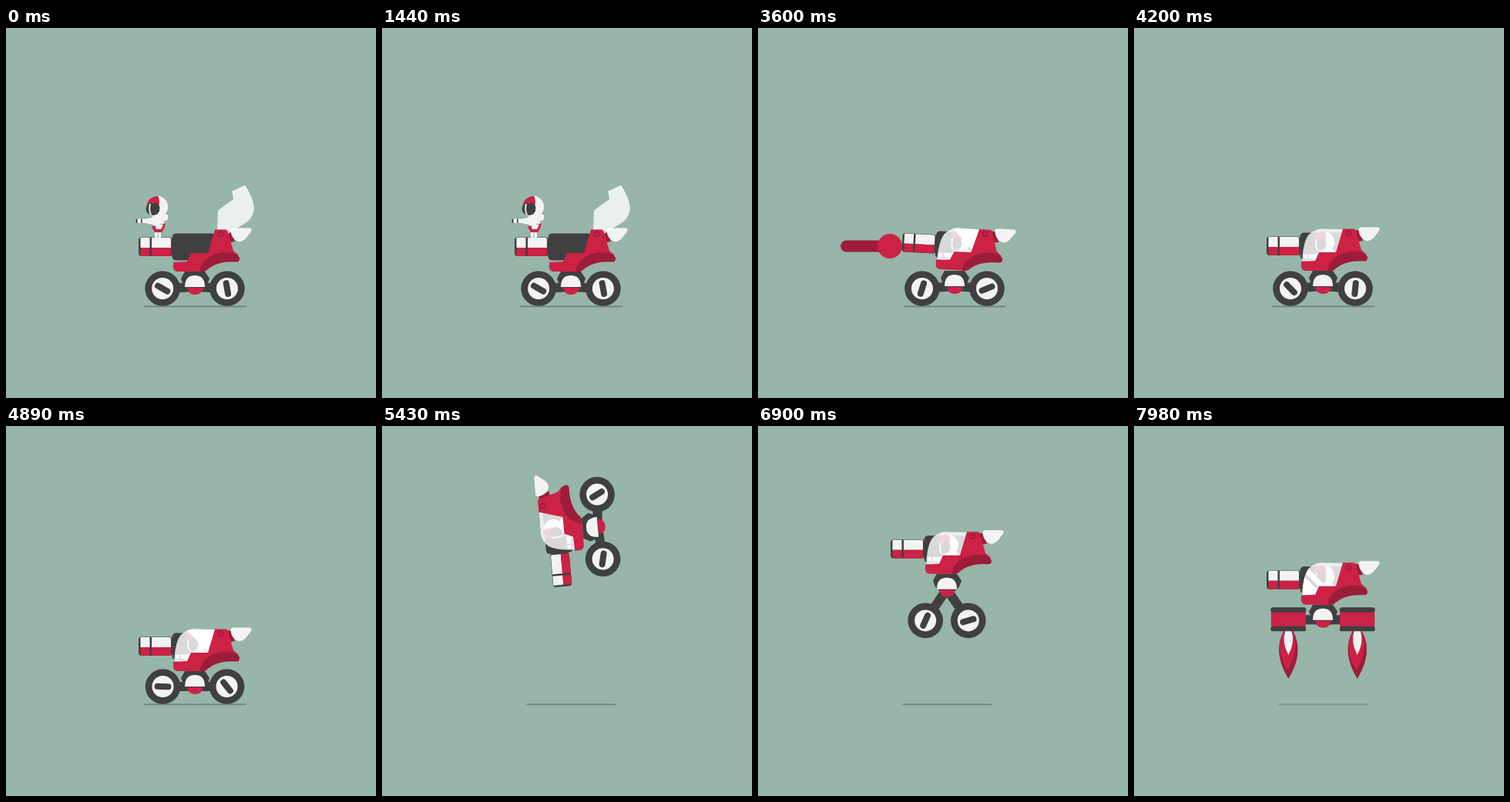
An HTML page that plays this animation: 480x480 px, repeating every 8 s.

```html
<!DOCTYPE html>
<html lang="en">
<head>
<meta charset="utf-8">
<title>Rover</title>
<style>
  html, body { margin: 0; width: 100%; height: 100%; overflow: hidden; background: #97b5a9; }
  svg { display: block; width: 100%; height: 100%; }
  .dark { fill: #404040; }
  .red { fill: #cb2246; }
  .deep { fill: #9c1d3a; }
  .white { fill: #f3f3f3; }
</style>
</head>
<body>
<svg viewBox="0 0 480 480">
  <defs>
    <path id="glass" d="M272 261 H262 L242 260.500 Q232 262 226 269 Q219 279 218.500 302 L237 304.500 L241 295 L266 293.500 L281 272 Z"/>
    <clipPath id="glassClip"><use href="#glass"/></clipPath>
    <g id="disc">
      <circle r="22.800" class="dark"/>
      <circle r="14" class="white"/>
    </g>
    <g id="jet">
      <rect x="-22.500" y="-11" width="45" height="22" rx="3" class="red"/>
      <rect x="-23" y="-15.500" width="46" height="6.500" rx="3.200" class="dark"/>
      <rect x="-23" y="9" width="46" height="6.500" rx="3.200" class="dark"/>
    </g>
    <g id="fire">
      <path d="M-6 0 Q-21 28 0 62 Q21 28 6 0 Z" class="deep"/>
      <path d="M-6 0 Q-18 26 -1 50 Q15 26 6 0 Z" class="red"/>
      <path d="M-4 0 Q-9 14 0 31 Q9 14 4 0 Z" class="white"/>
    </g>
  </defs>

  <rect width="480" height="480" fill="#97b5a9"/>
  <rect id="shadow" y="360.300" height="2" rx="1" fill="#6b8a7e"/>

  <g id="rover">
    <g id="base">
      <g id="legs" stroke="#404040" stroke-width="12" stroke-linecap="round"><line/><line/></g>
      <path d="M232 315 H258 L264 324 L261 332 L254 339 H237 L230 332 L227 324 Z" class="dark"/>
      <path d="M232 335 Q232 320 245 320 Q258 320 258 335 Z" class="white"/>
      <path d="M235 336 H256 Q254 345 245 345 Q237 345 235 336 Z" class="red"/>
      <g id="wheels"></g>
    </g>
    <g id="upper">
      <path d="M287 262 L293 263 L297 276 L291 277 Z" class="deep"/>
      <path d="M294 258.500 H316 Q320 259 318 263 L311 272 Q306 277 301 276 Q293 273 291.500 263 Q291 259 294 258.500 Z" class="white"/>
      <rect x="215.500" y="265.500" width="56" height="35" rx="5" class="dark"/>
      <rect x="172" y="270.500" width="44" height="24.500" rx="4" class="dark"/>
      <path d="M174.500 271 H186.500 V284 H174.500 Z M189 271 H212 Q214 271 214 273 V284 H189 Z" class="white"/>
      <path d="M174.500 284 H186.500 V295 H176 Q174.500 295 174.500 293 Z M189 284 H214 V293 Q214 295 212 295 H189 Z" class="red"/>
      <g id="pilot">
        <g id="pilotLegs" class="white">
          <rect x="193" y="261" width="3.500" height="11"/>
          <rect x="197.500" y="261" width="3.500" height="11"/>
        </g>
        <path d="M189 244 H204 L206 256 H191 Z" class="white"/>
        <path d="M189 257 L193 255 L207 252.500 L205 259 L202 264 H193 Z" class="red"/>
        <path d="M193 254 H204 L201 260 H195 Z" class="white"/>
        <circle cx="196.300" cy="230.800" r="13.800" class="white"/>
        <path d="M182.500 232 A13.800 13.800 0 0 1 197 217 Q200 222 198.500 229 L190 225 Z" class="red"/>
        <path d="M190 225.500 Q200 225.500 199.500 233.500 Q199 242 190 242 Q181 240.500 181.500 232.500 Q183 225.500 190 225.500 Z" class="dark"/>
        <path d="M187 227 Q185 235 188 241.500" fill="none" stroke="#f3f3f3" stroke-width="1.800"/>
        <path d="M183 246.500 L205 241 L207 248 L193 254 L183 253 Z" class="white"/>
        <circle cx="206" cy="244.500" r="4.500" class="white"/>
        <rect x="168.500" y="246.500" width="16" height="5.500" class="white"/>
        <path d="M168.500 246.500 h2 v5.500 h-2 Z M175 246.500 h1.500 v5.500 h-1.500 Z" class="dark"/>
      </g>
      <g id="canopy">
        <use href="#glass" fill="#fff" opacity=".8"/>
        <g clip-path="url(#glassClip)"><g id="glint" fill="#fff">
          <path d="M200 200 h34 l150 150 h-34 Z"/>
          <path d="M240 200 h10 l150 150 h-10 Z"/>
        </g></g>
      </g>
      <path d="M217 303 L235 302 L240 291 L262 291 L271 260.500 H285 Q287 260.500 288 264 L295 288 L302 294 L284 297 Q266 302 255 315 H224 Q217 315 217 309 Z" class="red"/>
      <path d="M251 316 Q252 303 265 295 Q278 288.500 294 290.500 Q302 293 303 298 Q303 303 298 302.500 Q273 301 259 314.500 Z" class="deep"/>
      <circle cx="278.500" cy="266.500" r="3" fill="#cb2246" stroke="#9c1d3a" stroke-width="1.800"/>
    </g>
  </g>
  <g id="shots"></g>
</svg>

<script>
const LOOP = 8000, GROUND_PIVOT = 343.7, LEG = 42.4;
const PILOT_SHOTS = [90, 360, 630, 900, 1170];
const CANNON_SHOTS = [3530, 4330];
const GLINTS = [2340, 3240, 4540, 5855, 7830];

const el = id => document.getElementById(id);
const set = (node, attrs) => { for (const k in attrs) node.setAttribute(k, attrs[k]); };
const prog = (t, a, b) => Math.min(1, Math.max(0, (t - a) / (b - a)));
const mix = (a, b, p) => a + (b - a) * p;
const smooth = p => p * p * (3 - 2 * p);

function make(tag, parent, attrs) {
  const node = document.createElementNS('http://www.w3.org/2000/svg', tag);
  set(node, attrs);
  parent.appendChild(node);
  return node;
}

const wheels = [0, 1].map(i => {
  const root = make('g', el('wheels'), {});
  const fire = make('use', root, { href: '#fire' });
  const jet = make('use', root, { href: '#jet' });
  const tyre = make('g', root, {});
  make('use', tyre, { href: '#disc' });
  const slot = make('line', tyre, { x1: -7, x2: 7, stroke: '#404040', 'stroke-width': 8, 'stroke-linecap': 'round' });
  return { root, fire, jet, tyre, slot, side: i ? 1 : -1, phase: i * 50, leg: el('legs').children[i] };
});

const makeShot = (x, y, size, speed, length) => start => ({
  start, x, y, size, speed, length,
  streak: make('rect', el('shots'), { class: 'deep', y: y - size / 2, height: size, rx: size / 2 }),
  flash: make('circle', el('shots'), { class: 'red', cx: x, cy: y })
});
const shots = [
  ...PILOT_SHOTS.map(makeShot(167, 250, 5, 0.8, 34)),
  ...CANNON_SHOTS.map(makeShot(171, 283, 15, 0.9, 100))
];

function height(t) {
  if (t < 2070) return 1;
  if (t < 4800) return 3 * Math.exp(-(t - 2070) / 110) * Math.cos((t - 2070) / 55 - 1.1);
  if (t < 4930) return 3 * smooth(prog(t, 4800, 4880));
  if (t < 5720) { const p = prog(t, 4930, 5720); return 3 * (1 - p) - 720 * p * (1 - p); }
  if (t < 6510) return 4 * Math.exp(-(t - 5720) / 110) * Math.sin((t - 5720) / 55);
  if (t < 6640) return 3 * smooth(prog(t, 6510, 6620));
  if (t < 7098) return 3 - 155 * (1 - (1 - prog(t, 6640, 7098)) ** 2);
  if (t < 7330) return mix(-152, -85, smooth(prog(t, 7098, 7330)));
  return -85 + 6 * Math.sin((t - 7330) / 620 * 2 * Math.PI);
}

function spin(t) {
  if (t < 2700) return 30 + 80 * prog(t, 2430, 2700);
  const airPause = Math.min(525, Math.max(0, t - 4950));
  return 110 + 0.197 * (t - 2700 - airPause);
}

const kick = (t, starts, rise, fall) => starts.reduce((sum, s) =>
  sum + smooth(prog(t, s, s + rise)) * (1 - smooth(prog(t, s + rise, s + rise + fall))), 0);

function drawPilot(t) {
  const p = prog(t, 1550, 2070);
  const x = 50 * p + 2 * kick(t, PILOT_SHOTS, 40, 150);
  const y = 47 * p - 320 * p * (1 - p);
  set(el('pilot'), { transform: `translate(${x} ${y})` });
  set(el('pilotLegs'), { visibility: p < 1 ? 'visible' : 'hidden' });
}

function drawWheels(t, y, tuck) {
  const jet = smooth(prog(t, 7080, 7280));
  const burn = prog(t, 7230, 7340) * (1 + 0.07 * Math.sin((t - 7980) / 25));
  const drop = Math.min(32, -5.7 - y) * (1 - tuck) - 5.7 * tuck;
  const dx = mix(Math.sqrt(LEG * LEG - drop * drop), 44.7, jet);
  const wy = GROUND_PIVOT + mix(drop, -9.7, jet);
  for (const w of wheels) {
    const wx = 245 + w.side * dx;
    set(w.root, { transform: `translate(${wx} ${wy})` });
    set(w.leg, { x1: 245, y1: 335, x2: wx, y2: wy });
    set(w.slot, { transform: `rotate(${spin(t) + w.phase})` });
    set(w.tyre, { transform: `scale(1 ${Math.max(0.001, 1 - jet)})`, visibility: jet < 1 ? 'visible' : 'hidden' });
    set(w.jet, { transform: `scale(1 ${jet})`, visibility: jet > 0 ? 'visible' : 'hidden' });
    set(w.fire, { transform: `translate(0 15) scale(1 ${burn})`, visibility: burn > 0 ? 'visible' : 'hidden' });
  }
}

function drawShots(t) {
  for (const s of shots) {
    const age = t - s.start;
    const live = age > 0 && age < 450;
    const head = s.x - s.speed * age;
    const tail = Math.min(s.x, head + s.length);
    set(s.streak, { x: head, width: Math.max(0, tail - head), visibility: live && tail > 0 ? 'visible' : 'hidden' });
    const r = s.size * 1.07 * prog(age, 0, 60) * (1 - smooth(prog(age, 75, 210)));
    set(s.flash, { r, visibility: live ? 'visible' : 'hidden' });
  }
}

function draw(t) {
  const y = height(t);
  const recoil = kick(t, CANNON_SHOTS, 70, 420);
  const flip = 360 * smooth(prog(t, 5020, 5640));
  const tuck = smooth(prog(t, 4990, 5110)) * (1 - smooth(prog(t, 5560, 5680)));
  const air = prog(-y, 0, 38);
  const half = mix(66.5, 58.5, air);

  set(el('rover'), { transform: `translate(${10 * recoil} ${y}) rotate(${flip} 245 300)` });
  set(el('upper'), { transform: `translate(${3 * recoil} 0) rotate(${3 * recoil} 262 320)` });
  set(el('shadow'), {
    x: 245.5 + 9.5 * recoil - half, width: 2 * half,
    opacity: 1 - 0.45 * prog(t, 7200, 7340)
  });
  set(el('canopy'), { transform: `rotate(${147 * (1 - smooth(prog(t, 2050, 2330)))} 279 266)` });

  const start = GLINTS.filter(s => s <= t).pop();
  const pos = start === undefined ? -200 : -140 + 0.32 * (t - start);
  set(el('glint'), { transform: `translate(${Math.min(pos, 60)} 0)` });

  drawPilot(t);
  drawWheels(t, y, tuck);
  drawShots(t);
}

const begin = performance.now();
function tick() {
  draw((performance.now() - begin) % LOOP);
  requestAnimationFrame(tick);
}
tick();
</script>
</body>
</html>
```
